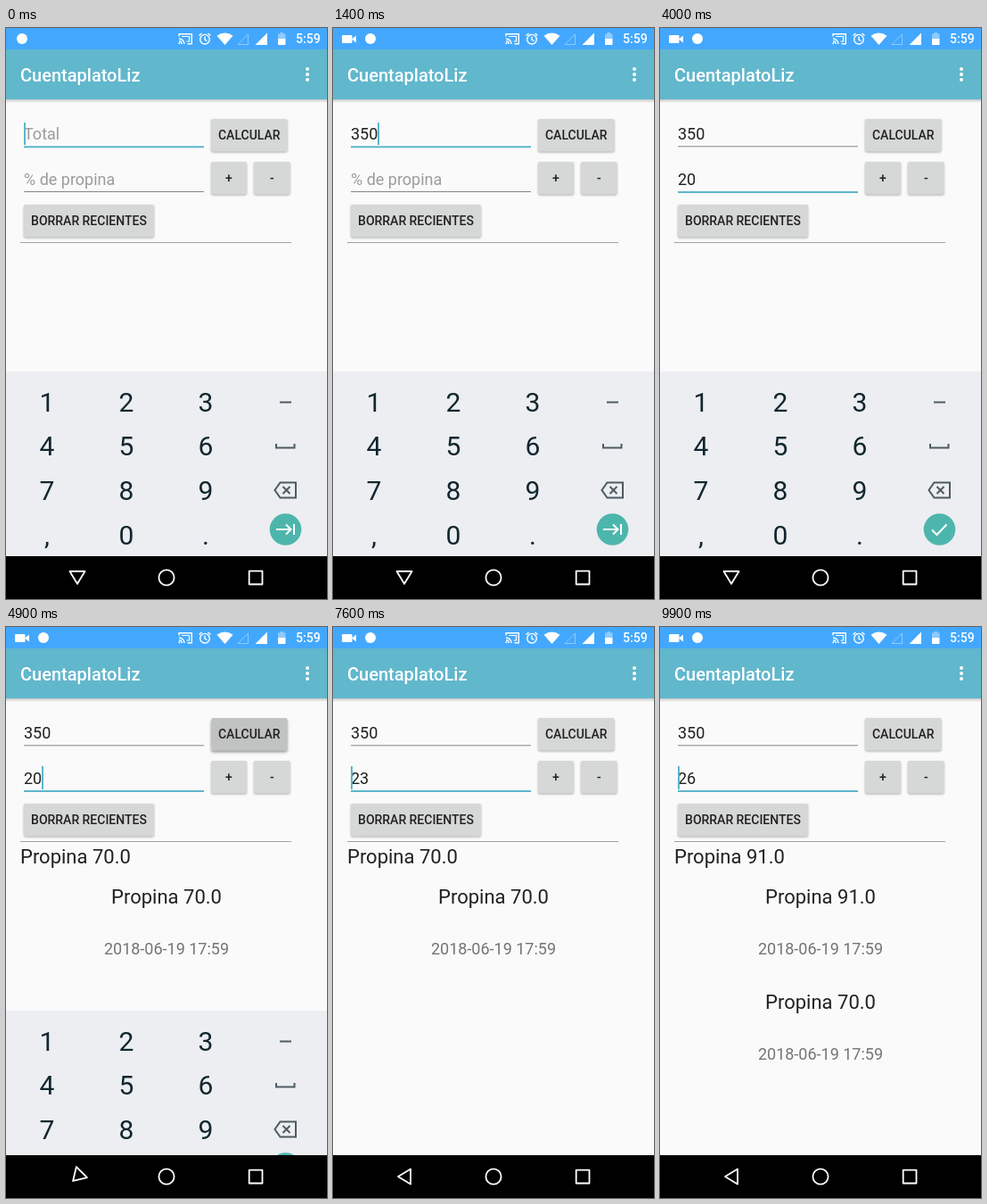
Animation of 360x640 px, one loop 10 s. Source, as an HTML page:

```html
<!DOCTYPE html>
<html lang="es">
<head>
<meta charset="utf-8">
<title>CuentaplatoLiz</title>
<style>
  html, body { margin: 0; width: 100%; height: 100%; overflow: hidden; background: #fafafa; }
  svg { display: block; width: 360px; height: 640px; font-family: Roboto, sans-serif; fill: #212121; }
  .line { fill: none; stroke: #fff; }
  .white { fill: #fff; }
  .accent { fill: #5cb6ca; }
  .bold { font-weight: 500; }
  .mid { text-anchor: middle; }
  .field { font-size: 18px; }
  .field.hint { fill: #9b9b9b; }
  .big { font-size: 22px; }
  .date { font-size: 18px; fill: #757575; }
  .face { fill: #d6d7d7; filter: drop-shadow(0 1px 1px rgba(0, 0, 0, .3)); }
  .face.down { filter: drop-shadow(0 2px 1.5px rgba(0, 0, 0, .38)); }
  .label { font-size: 14px; }
  .digit { font-size: 30px; fill: #12262f; }
  .mark { fill: none; stroke: #4c5b63; stroke-width: 2; }
</style>
</head>
<body>
<svg viewBox="0 0 360 640">
  <defs>
    <linearGradient id="shade" x2="0" y2="1">
      <stop stop-color="#000" stop-opacity=".2"/>
      <stop offset="1" stop-color="#000" stop-opacity="0"/>
    </linearGradient>
  </defs>
  <rect width="360" height="640" fill="#fafafa"/>
  <rect y="80" width="360" height="4" fill="url(#shade)"/>
  <rect y="24" width="360" height="56" fill="#61b7cc"/>
  <rect width="360" height="24" fill="#43a8fd"/>

  <!-- status bar -->
  <g id="camera" class="white">
    <rect x="10" y="8" width="11.5" height="9" rx="1.2"/>
    <path d="M21 12.5l5-4v8z"/>
  </g>
  <circle id="badge" class="white" cy="12" r="6"/>
  <g class="line" stroke-width="1.4">
    <path d="M194 9.500V6.700H208.300V17.800H203.500M194 12a6 6 0 0 1 6 6M194 14.800a3.200 3.200 0 0 1 3.200 3.200"/>
    <path d="M197 9.500h8.500v5.500h-3" stroke-width="1.200"/>
    <circle cx="223" cy="12.700" r="5.300"/>
    <path d="M223 9.500v3.500l2.500 1.500M216.500 8.500l3-2.500M229.500 8.500l-3-2.500"/>
  </g>
  <g class="white">
    <circle cx="194.300" cy="17.300" r="1"/>
    <path d="M236.500 8.800Q245.500 2.200 254.500 8.800L245.500 19z"/>
    <path d="M293 5.500V19H279.500z"/>
    <path d="M307.500 5h3.500v1.500h2.500V12h-8.500V6.500h2.500z" opacity=".4"/>
    <path d="M305 12h8.500v6.200q0 .8-.8.800h-6.900q-.8 0-.8-.8z"/>
    <path d="M271.500 7V18.500H260z" fill="none" stroke="#fff" opacity=".4"/>
    <text class="bold" x="325" y="17" font-size="14">5:59</text>
    <text class="bold" x="16" y="60" font-size="20">CuentaplatoLiz</text>
    <circle cx="338" cy="46" r="2"/>
    <circle cx="338" cy="52" r="2"/>
    <circle cx="338" cy="58" r="2"/>
  </g>

  <!-- form -->
  <text id="total" class="field" x="20" y="125"></text>
  <text id="tip" class="field" x="20" y="176"></text>
  <rect id="line1" x="20" width="202"/>
  <rect id="line2" x="20" width="202"/>
  <rect id="caret" class="accent" width="2"/>
  <g id="buttons"></g>
  <rect x="16" y="240" width="304" height="1" fill="#a2a2a2"/>

  <g id="results">
    <text id="latest" class="big" x="16" y="264.500"></text>
    <text id="first" class="big mid" x="180" y="310"></text>
    <text class="date mid" x="180" y="367">2018-06-19 17:59</text>
    <g id="older">
      <text class="big mid" x="180" y="427.500">Propina 70.0</text>
      <text class="date mid" x="180" y="484.500">2018-06-19 17:59</text>
    </g>
  </g>

  <g id="keyboard">
    <rect y="385" width="360" height="207" fill="#eceef1"/>
    <rect id="pressed" width="89" height="49" fill="#d3d9dd"/>
    <g id="keys"></g>
    <path class="mark" d="M307 419.500h13" stroke="#12262f"/>
    <path class="mark" d="M303 466v4.500h20.500v-4.500"/>
    <path class="mark" d="M307.500 509.500H325V526.500H307.500L301.500 518zM310.500 514l8 8M318.500 514l-8 8" stroke-width="1.800"/>
    <circle cx="313.500" cy="562" r="17.800" fill="#4db6ac"/>
    <path id="next" class="line" stroke-width="2" d="M303 562h16M314 556.500l5.500 5.500l-5.500 5.500M323 556v12"/>
    <path id="done" class="line" stroke-width="2" d="M305 562.500l5.500 5.500l11-11.500"/>
  </g>

  <!-- navigation bar -->
  <rect y="592" width="360" height="48"/>
  <rect y="592" width="360" height="48" fill="#000"/>
  <g class="line" stroke-width="1.800" stroke-linejoin="round">
    <path id="back" d="M71.500 609h17L80 623z"/>
    <circle cx="180" cy="616" r="8.600"/>
    <rect x="272.700" y="608.700" width="14.800" height="14.800"/>
  </g>
</svg>
<script>
const LOOP = 10000, STEP = 100;
const $ = id => document.getElementById(id);
const show = (id, on) => $(id).setAttribute('display', on ? 'inline' : 'none');
const set = (id, attrs) => {
  for (const k in attrs) $(id).setAttribute(k, attrs[k]);
};

// [id, x, y, width, label, touch x, touch times]
const buttons = [
  ['calc', 230, 102, 85.5, 'CALCULAR', 275, [4800, 9100]],
  ['plus', 230, 150, 40, '+', 250, [6600, 6800, 7000, 7700, 7900, 8100]],
  ['minus', 278, 150, 40.5, '-', 298, []],
  ['clear', 20, 198, 146, 'BORRAR RECIENTES', 93, []]
];
$('buttons').innerHTML = buttons.map(([id, x, y, w, label, cx]) => {
  const box = `x="${x}" y="${y}" width="${w}" height="36.5" rx="2"`;
  return `<clipPath id="${id}Clip"><rect ${box}/></clipPath>
    <rect id="${id}" class="face" ${box}/>
    <g clip-path="url(#${id}Clip)"><circle id="${id}Ripple" cx="${cx}" cy="${y + 18}" fill="#000"/></g>
    <text class="label bold mid" x="${x + w / 2}" y="${y + 23.3}">${label}</text>`;
}).join('');

const layout = ['123', '456', '789', ',0.'];
$('keys').innerHTML = layout.map((row, r) => [...row].map((c, i) =>
  `<text class="digit mid" x="${46 + 89 * i}" y="${429.7 + 49.6 * r}">${c}</text>`
).join('')).join('');

// Each list holds [start, value] pairs.
const totals = [[0, ''], [700, '3'], [1000, '35'], [1400, '350']];
const tips = [[0, ''], [3600, '2'], [3900, '20'], [6700, '21'], [6900, '22'], [7100, '23'],
  [7800, '24'], [8000, '25'], [8200, '26']];
const presses = [[0, ''], [600, '3'], [700, '5'], [1000, ''], [1100, '0'], [1400, ''],
  [3300, '2'], [3600, '0'], [4000, '']];
const slides = [[0, 0], [4900, 45], [5000, 140], [5100, 207]];
const turns = [[0, 0], [4900, 45], [5000, 90]];
// The caret flips at each of these times, starting visible.
const flips = [100, 600, 2300, 2800, 4000, 4900, 5500, 5700, 6000, 6700, 7300, 7600,
  8800, 9300, 9800, 9900];

const at = (list, t) => list.filter(([start]) => start <= t).pop()[1];

function drawField(id, value, hint) {
  $(id).textContent = value || hint;
  $(id).classList.toggle('hint', !value);
}

function drawLine(id, y, active) {
  set(id, { y, height: active ? 2 : 1, fill: active ? '#5cb6ca' : '#858585' });
}

function drawKeyboard(t) {
  const slide = at(slides, t), key = at(presses, t);
  show('keyboard', slide < 207);
  set('keyboard', { transform: `translate(0 ${slide})` });
  show('next', t < 1900);
  show('done', t >= 1900);
  show('pressed', key);
  if (key) {
    const row = layout.findIndex(r => r.includes(key));
    set('pressed', { x: 2 + 89 * layout[row].indexOf(key), y: 393 + 49.6 * row });
  }
}

function drawButtons(t) {
  for (const [id, , , w, , , touches] of buttons) {
    const start = touches.filter(s => s <= t).pop();
    const age = start === undefined ? 300 : t - start;
    $(id).classList.toggle('down', age < 300);
    show(id + 'Ripple', age < 300);
    set(id + 'Ripple', { r: w * (0.3 + age / 400), opacity: 0.13 * (1 - age / 400) });
  }
}

function draw(t) {
  const total = at(totals, t), tip = at(tips, t), second = t >= 1900;
  show('camera', t >= 100);
  set('badge', { cx: t < 100 ? 18 : 42 });
  drawField('total', total, 'Total');
  drawField('tip', tip, '% de propina');
  drawLine('line1', 132.3, !second);
  drawLine('line2', 183, second);

  const chars = second ? (t < 6700 ? tip.length : 0) : total.length;
  show('caret', flips.filter(f => f <= t).length % 2 === 0);
  set('caret', { x: 20 + 10 * chars, y: second ? 156 : 106, height: second ? 26 : 25 });

  const result = 'Propina ' + (t < 9200 ? '70.0' : '91.0');
  show('results', t >= 4900);
  show('older', t >= 9200);
  $('latest').textContent = $('first').textContent = result;

  drawButtons(t);
  drawKeyboard(t);
  set('back', { transform: `rotate(${at(turns, t)} 80 616)` });
}

const begin = performance.now();
function tick() {
  const t = (performance.now() - begin) % LOOP;
  draw(Math.floor(t / STEP) * STEP);
  requestAnimationFrame(tick);
}
tick();
</script>
</body>
</html>
```
